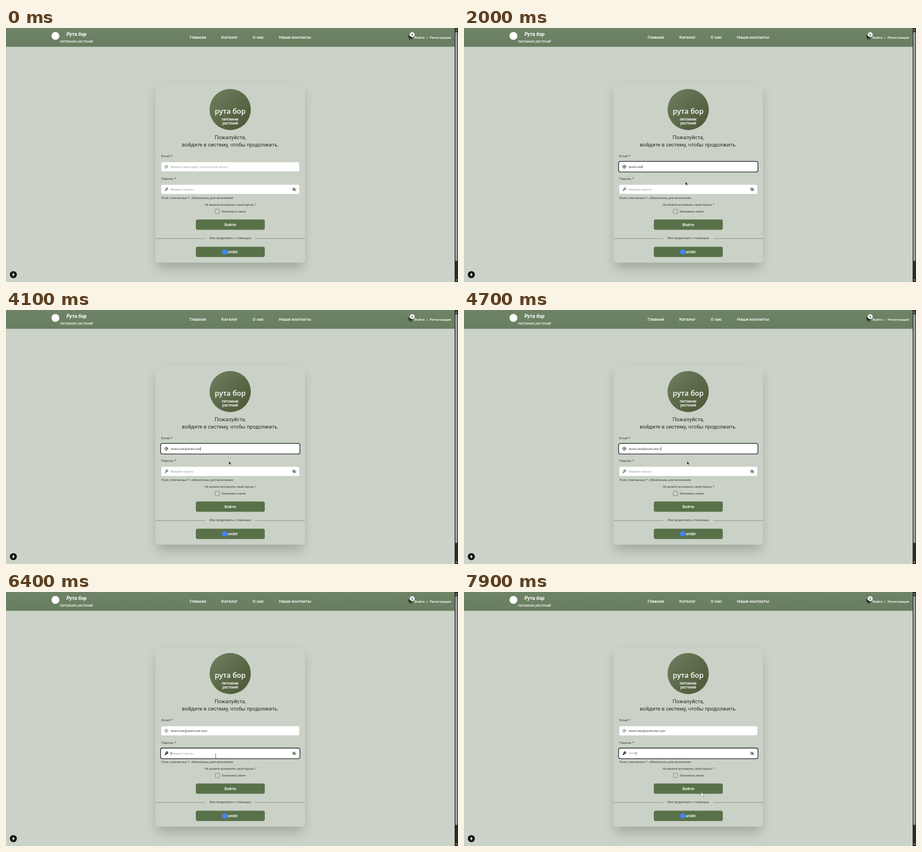
Write an HTML page that moves like this. It is 800 px wide and 450 px high and loops after 8 s.

```html
<!DOCTYPE html>
<html lang="ru">
<head>
<meta charset="utf-8">
<title>Вход</title>
<style>
  html, body { margin: 0; width: 100%; height: 100%; overflow: hidden; background: #cbd2c7; }
  svg { display: block; width: 100vw; height: 100vh; }
  text { font-family: Roboto, "Noto Sans", sans-serif; font-size: 5.43px; fill: #3a403a; white-space: pre; }
  .mid { text-anchor: middle; }
  .nav { font-size: 7.7px; font-weight: 500; fill: #fff; }
  .user { font-size: 6.25px; font-weight: 500; fill: #fff; }
  .head { font-size: 9.35px; fill: #2b302b; }
  .label { font-size: 6.15px; }
  .note { font-style: italic; }
  .hint { fill: #a0a3a3; }
  .btn { font-size: 7.2px; font-weight: 500; fill: #fff; }
  .brand { font-size: 8.9px; font-weight: 700; font-style: italic; fill: #fff; }
  .sub { font-size: 6.56px; font-style: italic; fill: #fff; }
  .badge { font: 600 12.6px "Open Sans", "Noto Sans", sans-serif; fill: #fff; }
  .badge2 { font-size: 6.4px; font-weight: 500; fill: #fff; }
  .ring { fill: #fff; stroke: #2c302d; stroke-width: 1.3; }
  .icon { fill: none; stroke: #777b79; stroke-width: .75; }
  .icon.on { stroke: #16181a; }
  .caret { fill: #222; }
</style>
</head>
<body>
<svg viewBox="0 0 800 450" preserveAspectRatio="none">
  <defs>
    <linearGradient id="bar" x2="0" y2="1">
      <stop offset="0" stop-color="#6f8466"/><stop offset="1" stop-color="#697e60"/>
    </linearGradient>
    <linearGradient id="disc" x2="1" y2="1">
      <stop offset="0" stop-color="#6f7f60"/><stop offset="1" stop-color="#4a5634"/>
    </linearGradient>
    <filter id="soft" x="-20%" y="-20%" width="140%" height="140%">
      <feGaussianBlur stdDeviation="10"/>
    </filter>
  </defs>

  <rect width="800" height="450" fill="#cbd2c7"/>
  <rect width="794" height="33.3" fill="url(#bar)"/>

  <circle cx="87.5" cy="14" r="7" fill="#fff"/>
  <text class="brand" x="107" y="14">Рута бор</text>
  <text class="sub" x="95.5" y="26">питомник растений</text>

  <text class="nav" x="325" y="19.2">Главная</text>
  <text class="nav" x="381" y="19.2">Каталог</text>
  <text class="nav" x="436.5" y="19.2">О нас</text>
  <text class="nav" x="483" y="19.2">Наши контакты</text>

  <g fill="none" stroke="#2b3228" stroke-width=".9">
    <path d="M710.5 13h1.6l1.6 5.4h4.8l1-3.6h-6.8"/>
    <path d="M713 14.8h6l-.8 3h-4.4z" fill="#2b3228"/>
    <circle cx="714.3" cy="20.2" r=".6"/><circle cx="718" cy="20.2" r=".6"/>
  </g>
  <circle cx="719" cy="11.8" r="4.3" fill="#fff"/>
  <text class="mid" x="719" y="13.8" style="font-weight:700">0</text>
  <text class="user" x="723" y="18.6">Войти</text>
  <text class="user" x="744" y="18.6">/</text>
  <text class="user" x="750" y="18.6">Регистрация</text>

  <rect x="267" y="110" width="259" height="315" rx="8" fill="#4f5a4b" opacity=".36" filter="url(#soft)"/>
  <rect x="264.3" y="99.5" width="265" height="316.3" rx="5" fill="#cad1c6"/>

  <circle cx="396.8" cy="144.4" r="36.5" fill="url(#disc)"/>
  <text class="badge mid" x="396.8" y="151.5">рута бор</text>
  <text class="badge2 mid" x="396.8" y="163.5">питомник</text>
  <text class="badge2 mid" x="396.8" y="170.8">растений</text>

  <text class="head mid" x="397" y="197.1">Пожалуйста,</text>
  <text class="head mid" x="397" y="210.2">войдите в систему, чтобы продолжить.</text>

  <text class="label" x="274.8" y="229.3">Email <tspan font-weight="700">*</tspan></text>
  <text class="label" x="274.8" y="269.3">Пароль <tspan font-weight="700">*</tspan></text>

  <g id="mail"></g>
  <g id="pass"></g>

  <g class="icon" style="stroke:#55595a">
    <path d="M506.3 286q3.7-5 7.4 0q-3.7 5-7.4 0z"/>
    <circle cx="510" cy="286" r="1.3" fill="#55595a"/>
    <path d="M506.8 282.8l6.6 6.2"/>
  </g>

  <text class="note" x="274.8" y="303.2">Поля, отмеченные <tspan font-weight="700">*</tspan> , обязательны для заполнения.</text>
  <text class="note mid" x="397.3" y="315">Не можете вспомнить свой пароль ?</text>
  <rect x="370.3" y="321" width="7.8" height="7.8" rx="1" fill="none" stroke="#70766f" stroke-width=".7"/>
  <text x="381.5" y="326.8">Запомнить меня</text>

  <rect x="336" y="339.2" width="122" height="18.2" rx="3.2" fill="#587149"/>
  <text class="btn mid" x="396.9" y="350.7">Войти</text>

  <path d="M264.5 373H352.5M441 373H529.2" stroke="#858d8c" stroke-width=".9"/>
  <text class="mid" x="397" y="374.3">Или продолжить с помощью</text>

  <rect x="336" y="387.6" width="122" height="18.2" rx="3.2" fill="#587149"/>
  <circle cx="387" cy="396.7" r="4.7" fill="#4285f4"/>
  <text class="btn" x="392.2" y="399.4">undel</text>

  <circle cx="13" cy="437" r="6.2" fill="#101211"/>
  <path d="M13.9 432.9l-3.5 4.7h2.2l-.5 3.5 3.6-4.8h-2.3z" fill="#fff"/>

  <rect x="794" width="6" height="450" fill="#2b2b2b"/>
  <rect x="795.1" y="7" width="3.9" height="406" rx="1.9" fill="#9d9d9d"/>
  <path d="M795.2 4.8l1.8-2.8 1.8 2.8zM795.2 445.4l1.8 2.8 1.8-2.8z" fill="#9d9d9d"/>

  <g id="arrow"><path d="M0 0v5.9l1.4-1.3 1 2.2 1-.5-1-2.1h1.9z" fill="#111" stroke="#fff" stroke-width=".35"/></g>
  <g id="beam"><path d="M-1.2-3h2.4M0-3v6M-1.2 3h2.4" fill="none" stroke="#4c4f4e" stroke-width=".7"/></g>
  <g id="hand"><path d="M-.6 0q.7-.8 1.4 0v3l2.6.7q.8.3.6 1.2l-.5 2.7q-.2.6-.8.6h-2.4q-.6 0-1-.6l-1.7-2.4q.3-1 1.8-.2z" fill="#fff" stroke="#252a25" stroke-width=".5"/></g>
</svg>

<script>
const LOOP = 8000;
const FOCUS_MAIL = 1200, FOCUS_PASS = 6400;
const MAIL = "taverLone@taverLone.com";
const $ = id => document.getElementById(id);

const steps = (start, gap, n) => Array.from({ length: n }, (_, i) => start + gap * i);
const mailKeys = [...steps(1400, 68, 9), 2800, ...steps(3300, 100, 9), 4350, 4600, 4800, 4950];
const passKeys = steps(6500, 58, 7);

// time, x, y of the pointer's hot spot
const path = [
  [300, 300, 455], [900, 310, 251], [1300, 310, 251], [1800, 392, 272.5],
  [2300, 392, 272.5], [2700, 394, 268], [3600, 394, 268], [4400, 394.8, 268],
  [5600, 394.8, 268], [6100, 371, 290.3], [7150, 371, 290.3], [7700, 420.3, 353.8]
];

function makeField(id, y, hint, icon) {
  $(id).innerHTML = `
    <rect x="274.8" y="${y - 8.1}" width="244.3" height="16.2" rx="2.6" fill="#fff"/>
    <rect class="ring" x="273.6" y="${y - 9.4}" width="246.7" height="18.8" rx="3.4"/>
    <g class="icon" transform="translate(283.7 ${y})">${icon}</g>
    <text class="hint" x="291.6" y="${y + 1.9}">${hint}</text>
    <text class="value" x="291.6" y="${y + 1.9}"></text>
    <rect class="caret" y="${y - 3.2}" width=".6" height="6.4"/>`;
  const part = name => $(id).querySelector("." + name);
  return { ring: part("ring"), icon: part("icon"), hint: part("hint"), value: part("value"), caret: part("caret") };
}

const mail = makeField("mail", 245.8, "Введите ваш адрес электронной почты",
  '<circle r="1.3"/><path d="M1.3-1.3V.5Q1.4 1.4 2.2 1.3Q3 1 3 0A3 3 0 1 0 1.4 2.7"/>');
const pass = makeField("pass", 285.9, "Введите пароль",
  '<circle cx="1" cy="-1" r="1.6" stroke-width="1.4"/><path d="M0 0L-2.7 2.7M-1.6 1.6l1 1" stroke-width="1.4"/>');

const show = (el, on) => el.setAttribute("visibility", on ? "visible" : "hidden");

function drawField(f, t, text, keys, from, to) {
  const typed = keys.filter(k => k <= t);
  const focused = t >= from && t < to;
  const last = typed.length ? typed[typed.length - 1] : from;
  f.value.textContent = text.slice(0, typed.length);
  const w = typed.length ? f.value.getComputedTextLength() : 0;
  f.caret.setAttribute("x", 291.7 + w);
  f.icon.classList.toggle("on", focused);
  show(f.ring, focused);
  show(f.hint, !typed.length);
  show(f.caret, focused && (t - last) % 1000 < 500);
}

function pointerAt(t) {
  const i = path.findIndex(p => p[0] > t);
  if (i < 0) return path[path.length - 1].slice(1);
  if (i === 0) return [-50, -50];
  const [t0, x0, y0] = path[i - 1], [t1, x1, y1] = path[i];
  const u = (t - t0) / (t1 - t0), e = u * u * (3 - 2 * u);
  return [x0 + (x1 - x0) * e, y0 + (y1 - y0) * e];
}

const inside = (x, y, l, t, r, b) => x > l && x < r && y > t && y < b;

function drawPointer(t) {
  const [x, y] = pointerAt(t);
  const overField = inside(x, y, 274, 237, 520, 255) || inside(x, y, 274, 277, 520, 295);
  const overButton = inside(x, y, 336, 339, 458, 357.5) || inside(x, y, 336, 387, 458, 406);
  const kind = overField ? "beam" : overButton ? "hand" : "arrow";
  for (const id of ["arrow", "beam", "hand"]) {
    show($(id), id === kind);
    $(id).setAttribute("transform", `translate(${x} ${y})`);
  }
}

const start = performance.now();
function draw() {
  const t = Math.max(0, performance.now() - start) % LOOP;
  drawField(mail, t, MAIL, mailKeys, FOCUS_MAIL, FOCUS_PASS);
  drawField(pass, t, "•••••••", passKeys, FOCUS_PASS, LOOP);
  drawPointer(t);
  requestAnimationFrame(draw);
}
draw();
</script>
</body>
</html>
```
